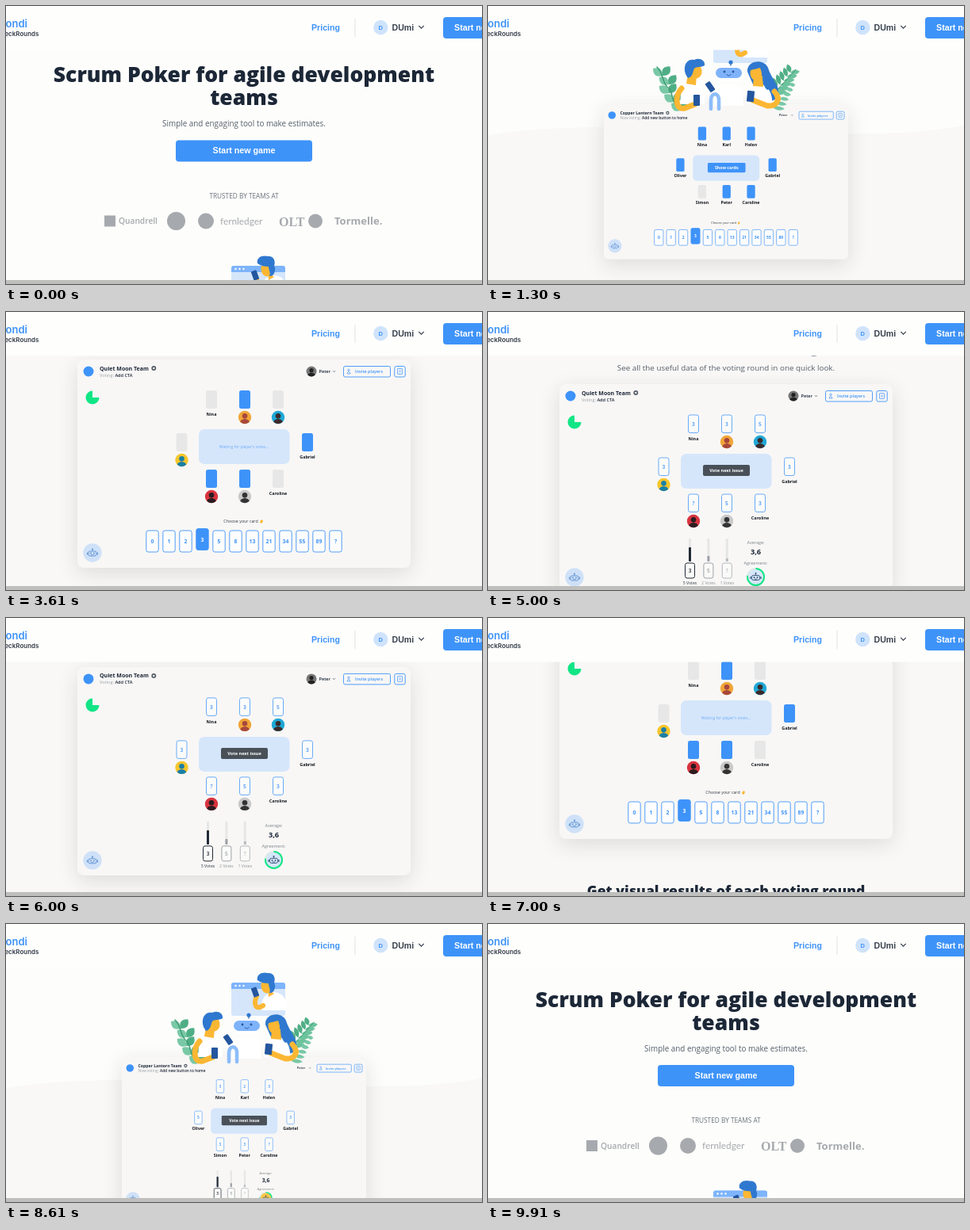
An HTML page with a canvas that plays this animation: 600x351 px, repeating every 10000 ms.

```html
<!DOCTYPE html>
<html lang="en">
<head>
<meta charset="utf-8">
<title>Scrum Poker</title>
<style>
html, body { margin: 0; width: 100%; height: 100%; overflow: hidden; background: #fdfdfb; }
canvas { display: block; width: 600px; height: 351px; }
</style>
</head>
<body>
<canvas id="stage"></canvas>
<script>
const W = 600, H = 351, LOOP = 10000, STEP = 100;
const canvas = document.getElementById('stage');
const ctx = canvas.getContext('2d');
const dpr = window.devicePixelRatio || 1;
canvas.width = W * dpr;
canvas.height = H * dpr;

const BLUE = '#3e93f9', PALE = '#d5e6fb', INK = '#1c2737', GREY = '#a6a9ad';
const NAVY = '#24569e', HAIR = '#2f78cf', SKIN = '#fbb733', GREEN = '#12e585';
const OPEN = '"Open Sans", "Noto Sans", sans-serif';
const ARIAL = '"Liberation Sans", Arial, sans-serif';
const INTER = 'Inter, sans-serif';

// ---------- drawing helpers ----------
function paint(fill, stroke, lw) {
  if (fill) { ctx.fillStyle = fill; ctx.fill(); }
  if (stroke) { ctx.strokeStyle = stroke; ctx.lineWidth = lw || 1; ctx.stroke(); }
}

function box(x, y, w, h, r, fill, stroke, lw) {
  ctx.beginPath();
  ctx.roundRect(x, y, w, h, r);
  paint(fill, stroke, lw);
}

function dot(x, y, r, fill, stroke, lw) {
  ctx.beginPath();
  ctx.arc(x, y, r, 0, 7);
  paint(fill, stroke, lw);
}

function oval(x, y, rx, ry, fill, turn = 0) {
  ctx.beginPath();
  ctx.ellipse(x, y, rx, ry, turn, 0, 7);
  paint(fill);
}

function shape(d, fill, stroke, lw) {
  const p = new Path2D(d);
  if (fill) { ctx.fillStyle = fill; ctx.fill(p); }
  if (stroke) { ctx.strokeStyle = stroke; ctx.lineWidth = lw; ctx.stroke(p); }
}

// y is the middle of the capitals
function label(s, x, y, size, color, o = {}) {
  ctx.font = `${o.w || 400} ${size}px ${o.font || OPEN}`;
  ctx.textAlign = o.align || 'center';
  ctx.fillStyle = color;
  ctx.fillText(s, x, y + size * 0.36);
  return ctx.measureText(s).width;
}

function at(x, y, scale, draw) {
  ctx.save();
  ctx.translate(x, y);
  ctx.scale(scale, scale);
  draw();
  ctx.restore();
}

function tilted(x, y, w, h, turn, fill) {
  ctx.save();
  ctx.translate(x, y);
  ctx.rotate(turn);
  box(-w / 2, -h / 2, w, h, 1, fill);
  ctx.restore();
}

// ---------- scrolling ----------
// [step, scroll offset]
const keys = [[0, 8.5], [13, 306.5], [36, 706], [50, 1049], [56, 1130],
              [70, 750], [86, 262.5], [99, 0], [100, 8.5]];
const last = keys.length - 1;
const slope = i => (keys[i + 1][1] - keys[i][1]) / (keys[i + 1][0] - keys[i][0]);

function tangent(i) {
  const a = slope(i % last === 0 ? last - 1 : i - 1), b = slope(i % last);
  return a * b > 0 ? 2 * a * b / (a + b) : 0;
}

function scrollAt(n) {
  let i = 0;
  while (n >= keys[i + 1][0]) i++;
  const [x0, y0] = keys[i], [x1, y1] = keys[i + 1];
  const d = x1 - x0, u = (n - x0) / d, v = 1 - u;
  return v * v * (1 + 2 * u) * y0 + u * u * (3 - 2 * u) * y1 +
         u * v * d * (v * tangent(i) - u * tangent(i + 1));
}

// ---------- game board ----------
const SEATS = [[169, 39], [211, 39], [253, 39], [131.5, 93], [290, 93],
               [169, 139], [211, 139], [253, 139]];
const NAMES = ['Nina', 'Karl', 'Helen', 'Oliver', 'Gabriel', 'Simon', 'Peter', 'Caroline'];
const DECK = ['0', '1', '2', '3', '5', '8', '13', '21', '34', '55', '89', '?'];
const FACES = { 1: ['#f0a63a', '#a8483c'], 2: ['#1fa8d6', '#3a2b2b'], 3: ['#f6c62c', '#1b7fa6'],
                5: ['#d8343f', '#2a1c20'], 6: ['#c9c9c9', '#333'] };

function face(x, y, r, [back, front]) {
  ctx.save();
  dot(x, y, r, back);
  ctx.clip();
  dot(x, y - r * 0.2, r * 0.4, front);
  oval(x, y + r * 0.9, r * 0.75, r * 0.65, front);
  ctx.restore();
}

function bot(x, y, color) {
  box(x - 5, y - 2.5, 10, 6, 2, null, color, 0.9);
  box(x - 7, y - 1, 1.2, 3, 0.5, color);
  box(x + 5.8, y - 1, 1.2, 3, 0.5, color);
  dot(x - 2, y, 0.9, color);
  dot(x + 2, y, 0.9, color);
  shape(`M${x - 2} ${y + 2}h4M${x} ${y - 2.5}v-2`, null, color, 0.7);
  dot(x, y - 5, 1, color);
}

function chevron(x, y, r, lw) {
  shape(`M${x - r} ${y - r / 2}l${r} ${r}l${r} ${-r}`, null, '#39424e', lw);
}

function boardHead(b) {
  dot(14, 15, 6.5, BLUE);
  const w = label(b.team, 28, 11, 7, INK, { w: 700, align: 'left' });
  dot(34.5 + w, 11, 2.1, null, '#555c66', 1.7);
  const v = label(b.lead + ' ', 28, 19.5, b.sub, '#9aa0a6', { align: 'left' });
  label(b.issue, 28 + v, 19.5, b.sub, INK, { w: 600, align: 'left' });
  if (!b.hero) face(295, 15, 6.5, ['#777', '#222']);
  label('Peter', b.hero ? 301 : 304.5, 15, 5.6, INK, { w: 600, align: 'left' });
  chevron(323.5, 15, 1.6, 0.7);
  box(335.5, 8.5, 59, 13.5, 2, null, BLUE, 0.9);
  dot(342, 13.4, 1.2, null, BLUE, 0.7);
  shape('M340 18c0-3 4-3 4 0z', null, BLUE, 0.7);
  label('Invite players', 367.5, 15.2, 5.4, BLUE, { w: 600 });
  box(399.8, 8.5, 13.4, 13.5, 2, null, BLUE, 0.9);
  box(403.5, 11.5, 6, 7, 0.5, null, BLUE, 0.7);
  shape('M405 14h3M405 16h3', null, BLUE, 0.6);
}

function seat(b, i) {
  const [x, y] = SEATS[i];
  if (b.votes) {
    box(x - 6.5, y, 13, 22.5, 2.5, '#fbfbfa', '#5aa2f6', 0.9);
    label(b.votes[i], x, y + 11.5, 6.6, BLUE, { w: 600 });
  } else {
    box(x - 7, y, 14, 23, 2.5, b.ready[i] === '1' ? BLUE : '#e7e7e7');
  }
  if (!b.hero && FACES[i]) face(x, y + 34, 8.2, FACES[i]);
  else label(NAMES[i], x, y + 30.3, b.hero ? 7.2 : 5.4, '#14181f', { w: 700 });
}

function deck() {
  label('Choose your card', 206, 204.5, 5.3, '#333a44');
  oval(232, 204.5, 1.6, 2.4, '#fbb733', 0.5);
  DECK.forEach((s, i) => {
    const x = 94.5 + 21 * i, on = i === 3, y = on ? 213.5 : 216;
    box(x - 7.7, y, 15.4, 27, 2.5, on ? BLUE : '#fdfdfd', BLUE, 0.9);
    label(s, x, y + 13.8, 6.8, on ? '#fff' : BLUE, { w: 700 });
  });
}

function results(hero) {
  ['3', '5', '?'].forEach((s, i) => {
    const x = 164.5 + 23.4 * i, tall = [18, 7, 4][i], c = ['#212a35', '#9da1a6', '#b6b9bd'][i];
    box(x - 1.5, 195, 3, 29, 1, '#e6e6e5');
    box(x - 1.5, 224 - tall, 3, tall, 1, c);
    box(x - 6, 226, 12, 19, 2.5, '#fafaf9', c, 1);
    label(s, x, 235.5, 6.5, c, { w: 600 });
    label([5, 2, 1][i] + ' Votes', x, 250.8, 5.2, i ? '#8d9298' : '#333a44');
  });
  label('Average:', 247.5, 200.3, 5.5, '#7d8389');
  label('3,6', 247.5, 212, 9.2, INK, { w: 700 });
  label('Agreement:', 247.5, 226.5, 5.5, '#7d8389');
  dot(247.5, 243.5, 10.5, hero ? '#f9c64a' : PALE, '#dcebe4', 2);
  ctx.beginPath();
  ctx.arc(247.5, 243.5, 10.5, -Math.PI / 2, Math.PI * 1.05);
  paint(null, GREEN, 2);
  bot(247.5, 244, '#2f4a6b');
}

function board(b) {
  ctx.save();
  ctx.shadowColor = 'rgba(40,40,50,.13)';
  ctx.shadowBlur = 26 * dpr;
  ctx.shadowOffsetY = 7 * dpr;
  box(0, 0, 420, b.hero ? 267 : 263, 8, '#f8f7f6');
  ctx.restore();
  at(0, b.hero ? 4 : 0, 1, () => boardHead(b));
  if (!b.hero) {
    ctx.beginPath();
    ctx.moveTo(19, 48);
    ctx.arc(19, 48, 8.5, 0, Math.PI * 1.5);
    paint(GREEN);
  }
  box(153, 88, 114.5, 44, 7, PALE);
  if (b.votes) {
    const w = b.hero ? 78 : 59;
    box(210.5 - w / 2, 102 - (b.hero ? 1 : 0), w, b.hero ? 16.5 : 14, 2, '#495058');
    label('Vote next issue', 210.5, 109.2, b.hero ? 6.9 : 5.6, '#fff', { w: 700 });
  } else if (b.hero) {
    box(178.5, 101, 65, 16.5, 2, BLUE);
    label('Show cards', 211, 109.3, 7.2, '#fff', { w: 700 });
  } else {
    label("Waiting for player's votes...", 210, 110, 5, '#6fabf6');
  }
  SEATS.forEach((_, i) => seat(b, i));
  if (b.votes) results(b.hero); else deck();
  dot(19, 244, 11.7, '#cfe1f8');
  bot(19, 244.5, '#5b8fd0');
}

const heroBoard = { hero: true, team: 'Copper Lantern Team', lead: 'Now voting:',
                    issue: 'Add new button to home', sub: 6.5, ready: '11111011' };
const heroDone = { ...heroBoard, votes: '3235333?' };
const vote = { team: 'Quiet Moon Team', lead: 'Voting:', issue: 'Add CTA', sub: 5.6, ready: '01001110' };
const reveal = { ...vote, votes: '33533?53' };

// ---------- people and robot ----------
function leaf(x, y, len, wide, turn, color) {
  ctx.save();
  ctx.translate(x, y);
  ctx.rotate(turn);
  ctx.beginPath();
  ctx.moveTo(0, 0);
  ctx.quadraticCurveTo(len * 0.5, -wide, len, 0);
  ctx.quadraticCurveTo(len * 0.5, wide, 0, 0);
  paint(color);
  ctx.restore();
}

function plants() {
  for (let i = 0; i < 5; i++) {
    const x = 216 + i * 5 + 3 * Math.sin(i * 2), y = 124 + i * 11;
    leaf(x + 4, y + 8, 15, 10, -2.5, '#79c8a6');
    leaf(x + 4, y + 8, 15, 10, -0.9, '#4fae86');
  }
  shape('M213 121C222 130 219 142 228 148C234 154 230 166 242 174', null, '#3f9c74', 1.5);
  for (let i = 0; i < 6; i++) {
    const x = 360 + i * 4.2, y = 154 - i * 5.2;
    leaf(x, y, 16 - i, 6, -1.9, '#4fae86');
    leaf(x, y, 17 - i, 6, -0.1, '#6cc29d');
    leaf(x - 1, y + 18 - i * 0.6, 15 - i * 1.5, 5, 0.15, '#79c8a6');
  }
  shape('M356 160C366 148 376 138 388 124', null, '#3f9c74', 1);
}

function people() {
  ctx.lineCap = 'round';
  ctx.lineJoin = 'round';
  plants();

  // browser window
  box(284, 74, 68, 42, 3, PALE);
  box(284, 74, 68, 8, [3, 3, 0, 0], '#7db4fb');
  [289.5, 294.5, 299.5].forEach(x => dot(x, 78, 1.2, '#fff'));

  // man on top
  shape('M322 109C320 95 328 86 338 86C350 87 355 96 353 109Z', '#fff');
  shape('M324 103C314 110 312 100 316 91', null, SKIN, 6);
  tilted(314, 86, 7, 12, -0.35, NAVY);
  oval(328, 79, 6.5, 8.5, SKIN, -0.2);
  shape('M330 82L338 88L331 92Z', SKIN);
  shape('M317 71C315 63 324 60 330 62C338 61 340 69 338 74C341 79 338 88 332 87C334 82 331 80 331 75C326 75 321 74 317 71Z', HAIR);

  // robot
  shape('M306 121V116', null, NAVY, 1.2);
  dot(306, 115, 2.6, HAIR);
  shape('M284 170L287 150C289 139 318 139 320 150L322 170Z', '#fff');
  box(286, 119.5, 36, 20, 9, '#fff');
  box(287, 122, 33, 13, 6.5, '#7fb3f9');
  dot(298, 127, 1.4, NAVY);
  dot(309, 127, 1.4, NAVY);
  shape('M301 130.5C302 132.5 305 132.5 306 130.5', null, NAVY, 1);
  shape('M281 174V163C281 152 292 153 291 164V174', null, '#8dbdf9', 4.5);
  tilted(280, 146, 7, 13, -0.6, NAVY);

  // man on the left
  shape('M243 168C241 148 248 138 258 138C270 140 273 154 273 168Z', '#fff');
  shape('M252 130L263 130L262 144L250 142Z', SKIN);
  oval(262, 126, 7.5, 9.5, SKIN, -0.15);
  shape('M249 130C245 118 252 110 260 112C266 109 274 112 273 119C268 122 263 120 260 123C258 127 258 134 252 135Z', HAIR);
  shape('M244 148C235 158 236 176 248 173L261 168', null, SKIN, 7);
  box(259, 156, 8, 14, 1, NAVY);

  // woman on the right
  shape('M327 127C326 112 348 110 353 122C357 136 368 144 366 156C364 168 340 166 338 152Z', HAIR);
  shape('M325 168C325 148 332 142 342 142C354 144 359 156 358 168Z', '#fff');
  shape('M335 132L346 132L347 146L334 145Z', SKIN);
  oval(338, 128, 7.5, 10, SKIN, 0.1);
  shape('M328 126C328 113 350 112 352 126C353 138 357 146 353 150C346 148 347 132 343 122C340 123 334 124 328 126Z', HAIR);
  shape('M361 152C370 162 364 171 352 170L334 163', null, SKIN, 7);
  tilted(331, 158, 9, 14, 0.1, NAVY);
  ctx.lineCap = 'butt';
}

// ---------- page ----------
function intro() {
  const title = { w: 800 };
  label('Scrum Poker for agile development', 300, 95, 26.5, INK, title);
  label('teams', 300, 124, 26.5, INK, title);
  label('Simple and engaging tool to make estimates.', 300, 157, 9.9, '#56606c');
  box(214, 178, 172, 27, 4, BLUE);
  label('Start new game', 300, 191, 10.7, '#fff', { w: 700, font: ARIAL });
  label('TRUSTED BY TEAMS AT', 300, 248.5, 8.25, '#6a727c');

  const left = { align: 'left' };
  box(124, 273, 14, 14, 0, GREY);
  label('Quandrell', 142, 280, 10.2, GREY, { ...left, w: 600 });
  dot(214.5, 280, 11.5, GREY);
  dot(252, 280, 10, GREY);
  label('fernledger', 270, 280, 11.8, GREY, { ...left, font: 'Lato, sans-serif' });
  label('OLT', 344, 280.5, 16, GREY, { ...left, w: 700, font: '"Liberation Serif", serif' });
  dot(390, 280, 9, GREY);
  label('Tormelle.', 414, 280, 13, GREY, { ...left, w: 700 });
}

function header() {
  ctx.fillStyle = '#fefefd';
  ctx.fillRect(0, 0, W, 55.5);
  label('ondi', 27, 22.8, 13, BLUE, { w: 600, font: INTER, align: 'right' });
  label('eckRounds', 41.5, 35, 8, '#333b47', { w: 600, font: INTER, align: 'right' });
  const bold = { w: 700, font: ARIAL, align: 'left' };
  label('Pricing', 385, 27, 10.6, BLUE, bold);
  ctx.fillStyle = '#dfe1e3';
  ctx.fillRect(439.5, 16, 1, 23);
  dot(472.3, 27, 9.2, '#cfe3fb');
  label('D', 472.3, 27.2, 7.5, BLUE, { w: 700, font: ARIAL });
  label('DUmi', 486.5, 27, 10.6, '#39424e', bold);
  chevron(523.5, 26.5, 3.2, 1.3);
  box(551, 14, 80, 27, 4, BLUE);
  label('Start new game', 565, 27, 10.7, '#fff', bold);
}

function draw(n) {
  ctx.setTransform(dpr, 0, 0, dpr, 0, 0);
  ctx.fillStyle = '#fdfdfb';
  ctx.fillRect(0, 0, W, H);
  ctx.save();
  ctx.translate(0, -scrollAt(n));
  shape('M0 470C150 440 450 488 600 457V1700H0Z', '#f9f8f6');
  intro();
  at(146, 430.5, 308 / 420, () => board(n < 50 ? heroBoard : heroDone));
  at(0, 262.5, 1, people);
  at(90, 766, 1, () => board(vote));
  label('Get visual results of each voting round', 300, 1094.5, 17.6, INK, { w: 800 });
  label('See all the useful data of the voting round in one quick look.', 300, 1119, 9.85, '#56606c');
  at(90, 1140, 1, () => board(reveal));
  ctx.restore();
  header();
  ctx.fillStyle = '#bfbfbe';
  ctx.fillRect(0, 346, W, 5);
}

const start = performance.now();
function tick() {
  const t = (performance.now() - start) % LOOP;
  draw(Math.floor(t / STEP));
  requestAnimationFrame(tick);
}
draw(0);
requestAnimationFrame(tick);
</script>
</body>
</html>
```
